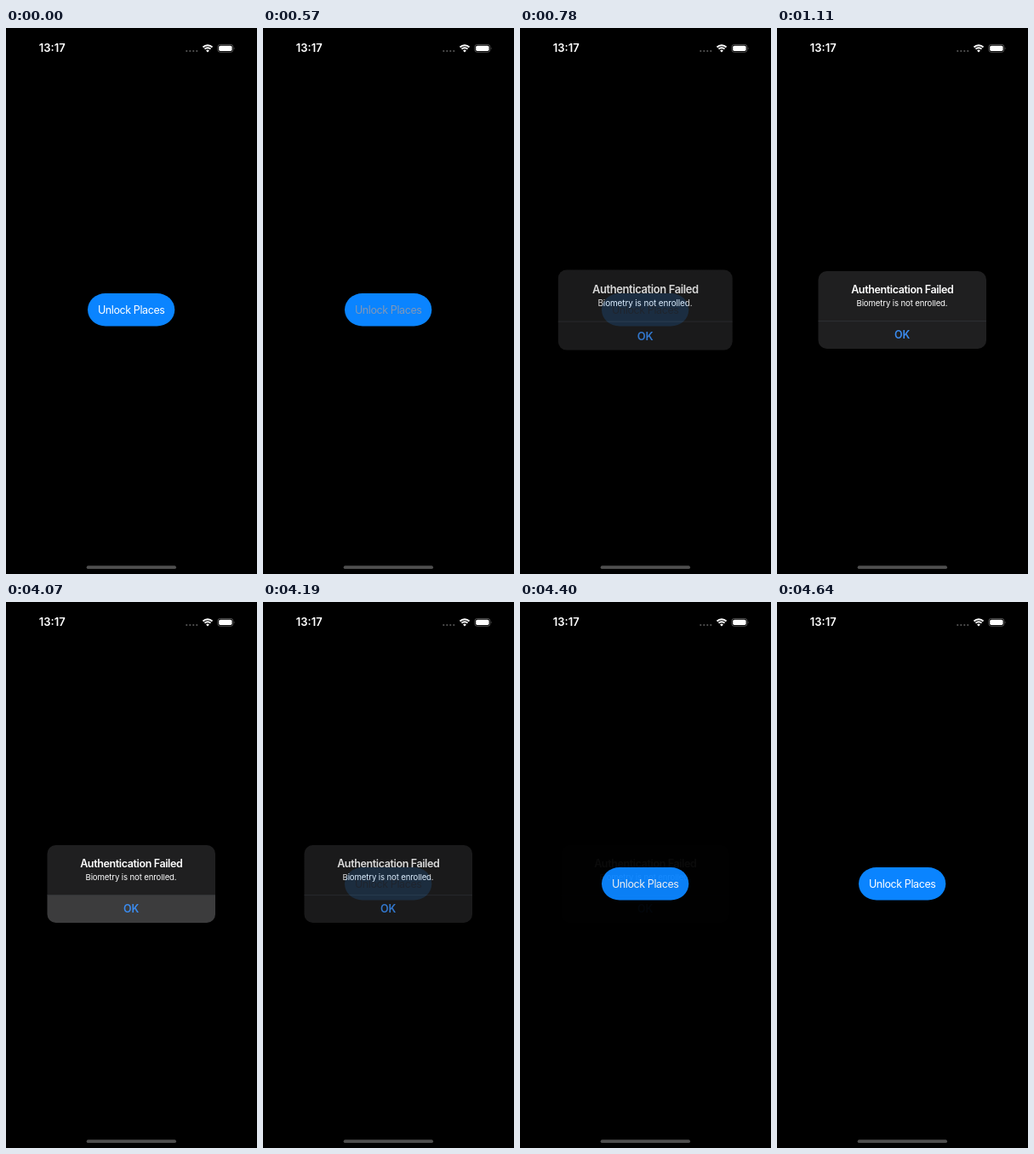
Write an HTML page that moves like this. It is 295 px wide and 640 px high and loops after 8 s.

```html
<!DOCTYPE html>
<html lang="en">
<head>
<meta charset="utf-8">
<title>Unlock alert</title>
<style>
  html, body { margin: 0; width: 100%; height: 100%; overflow: hidden; background: #000; }
  svg { display: block; width: 100vw; height: 100vh; }
  text { font-family: Inter, "Liberation Sans", sans-serif; font-size: 12.5px; fill: #fff; text-anchor: middle; }
  .bold { font-weight: 600; }
</style>
</head>
<body>
<svg viewBox="0 0 295 640">
  <defs>
    <radialGradient id="glow" gradientUnits="userSpaceOnUse" r="1" gradientTransform="translate(147 331) scale(70 48)">
      <stop offset="0" stop-color="#14283a"/>
      <stop offset=".45" stop-color="#18242f"/>
      <stop offset="1" stop-color="#1f1f20"/>
    </radialGradient>
    <clipPath id="panel"><rect x="48.5" y="285" width="197.5" height="91" rx="10"/></clipPath>
  </defs>

  <!-- status bar -->
  <text class="bold" x="54.3" y="28.4" style="font-size:13px">13:17</text>
  <path d="M212.3 27h13" stroke="#555" stroke-width="2.2" stroke-linecap="round" stroke-dasharray="0 4"/>
  <g fill="none" stroke="#fff" stroke-width="1.9">
    <path d="M231.5 22.5a7.8 7.8 0 0 1 11 0M233.5 24.7a4.9 4.9 0 0 1 7 0"/>
    <path d="M237 28.4l-1.9-2a2.7 2.7 0 0 1 3.8 0z" fill="#fff" stroke="none"/>
  </g>
  <rect x="248.9" y="19.4" width="18" height="8.9" rx="2.8" fill="none" stroke="#666" stroke-width=".8"/>
  <rect x="250.2" y="20.7" width="15.4" height="6.3" rx="1.7" fill="#fff"/>
  <path d="M267.9 22.4q1.2 1.4 0 2.9z" fill="#777"/>

  <rect x="96" y="311" width="102.3" height="38.5" rx="21" ry="19.2" fill="#0a84ff"/>
  <text id="label" x="147.2" y="335" letter-spacing="-.4">Unlock Places</text>

  <g id="alert">
    <g clip-path="url(#panel)">
      <rect x="48" y="285" width="199" height="91" fill="url(#glow)"/>
      <rect id="row" x="48" y="343.5" width="199" height="33" fill="#fff" opacity="0"/>
    </g>
    <path d="M48.5 343.6h197.5" stroke="#36383b" stroke-width=".7"/>
    <text class="bold" x="147.3" y="311.4" letter-spacing="-.38">Authentication Failed</text>
    <text x="147" y="326.2" letter-spacing="-.12" style="font-size:9.6px">Biometry is not enrolled.</text>
    <text class="bold" x="147.2" y="364.4" style="fill:#3b8cf0">OK</text>
  </g>

  <rect x="94.7" y="630.3" width="105.3" height="3.8" rx="1.9" fill="#4e4e4e"/>
</svg>
<script>
const LOOP = 8000;
const $ = id => document.getElementById(id);
const label = $("label"), alertBox = $("alert"), row = $("row");

// Each state holds until the next: start ms, alert opacity, label brightness
const states = [
  [0, 0, 1], [570, 0, .45], [680, .5, .12], [780, .85, 0], [890, .96, 0], [1000, .99, 0],
  [1110, 1, 0], [4070, 1, 0], [4190, .86, 0], [4300, .2, .85], [4400, .04, .96], [4500, 0, .98], [4640, 0, 1]
];

const mix = (a, b, k) => Math.round(a + (b - a) * k);

function draw(now) {
  const t = now % LOOP;
  const [start, opacity, bright] = states.findLast(s => s[0] <= t);
  const opening = start >= 680 && start < 1110;
  const scale = opening ? 1 + .108 * Math.exp((680 - start) / 95) : 1;

  alertBox.setAttribute("opacity", opacity);
  alertBox.setAttribute("transform", `translate(147.25 330.5) scale(${scale}) translate(-147.25 -330.5)`);
  row.setAttribute("opacity", start === 4070 ? .13 : 0);
  label.style.fill = `rgb(${[25, 65, 125].map(c => mix(c, 255, bright))})`;
}

const origin = performance.now();
function tick() {
  draw(performance.now() - origin);
  requestAnimationFrame(tick);
}
tick();
</script>
</body>
</html>
```
